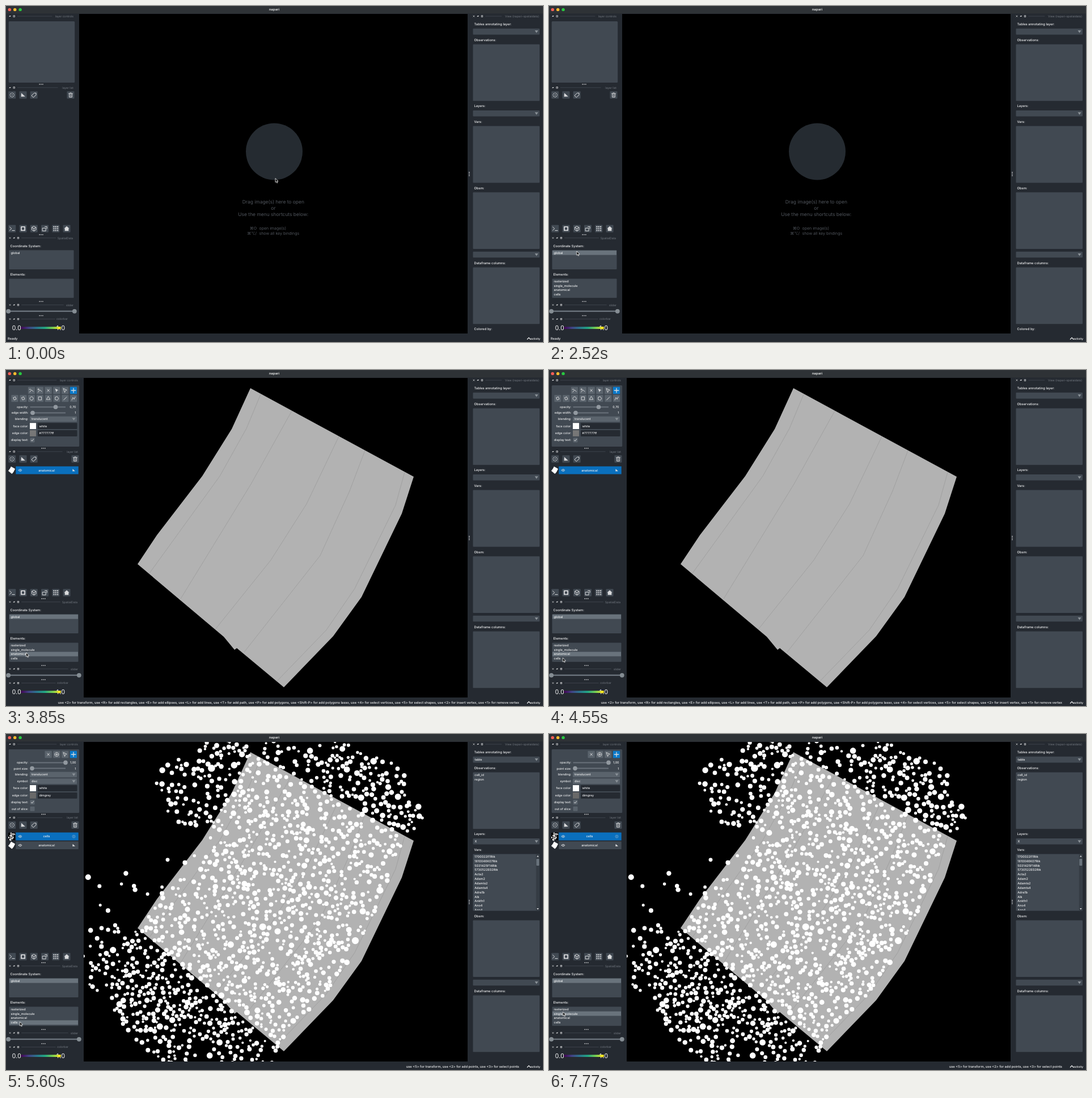
An HTML page for the animation above (8 s loop, 947 by 592 pixels).

```html
<!DOCTYPE html>
<html lang="en">
<head>
<meta charset="utf-8">
<title>napari</title>
<style>
html, body { margin: 0; width: 100%; height: 100%; overflow: hidden; background: #252a31; }
svg { display: block; width: 947px; height: 592px; }
text { font-family: Inter, "Noto Sans", sans-serif; text-rendering: geometricPrecision; white-space: pre; }
.num { font-family: "Open Sans", sans-serif; }
.narrow, .wide, .shapes, .points, .selected, .anatomical, .cells, .single {
  animation: 8s step-end infinite;
}
.narrow { animation-name: narrow; }
.wide { animation-name: wide; }
.shapes { animation-name: shapes; }
.points { animation-name: points; }
.selected { animation-name: selected; }
.anatomical { animation-name: anatomical; }
.cells { animation-name: cells; }
.single { animation-name: single; }
@keyframes narrow { 0% { opacity: 1 } 48.125%, 100% { opacity: 0 } }
@keyframes wide { 0% { opacity: 0 } 48.125%, 100% { opacity: 1 } }
@keyframes shapes { 0% { opacity: 0 } 48.125% { opacity: 1 } 70%, 100% { opacity: 0 } }
@keyframes points { 0% { opacity: 0 } 70%, 100% { opacity: 1 } }
@keyframes selected { 0% { opacity: 0 } 26.25%, 100% { opacity: 1 } }
@keyframes anatomical { 0% { opacity: 0 } 44.625% { opacity: 1 } 65.625%, 100% { opacity: 0 } }
@keyframes cells { 0% { opacity: 0 } 65.625% { opacity: 1 } 97.125%, 100% { opacity: 0 } }
@keyframes single { 0% { opacity: 0 } 97.125%, 100% { opacity: 1 } }
#cursor { animation: cursor 8s ease-in-out infinite; }
@keyframes cursor {
  0%, 9.625% { transform: translate(475px, 303.5px); animation-timing-function: cubic-bezier(.45, 0, .7, .9) }
  17.5% { transform: translate(126px, 417.7px); animation-timing-function: ease-out }
  20.125% { transform: translate(67px, 424px); animation-timing-function: ease-out }
  24.5%, 30.625% { transform: translate(49px, 431px) }
  41.125%, 48.125% { transform: translate(35.5px, 498px) }
  56.875%, 81.375% { transform: translate(24.3px, 507px) }
  87.5%, 91.875% { transform: translate(24.3px, 484px) }
  94.5%, 100% { transform: translate(24.5px, 489.5px) }
}
</style>
</head>
<body>
<svg id="stage" viewBox="0 0 947 592" xmlns="http://www.w3.org/2000/svg"></svg>
<script>
const BG = '#252a31', BOX = '#414952', BTN = '#5a636c', HI = '#69737c', TEXT = '#f0f1f2',
      DIM = '#747a82', FAINT = '#50555c', ICON = '#d9dadc', BLUE = '#0a6fbd';

// Drawing helpers
const each = (list, fn) => list.map(fn).join('');
const rect = (x, y, w, h, fill, r = 0) =>
  `<rect x="${x}" y="${y}" width="${w}" height="${h}" rx="${r}" fill="${fill}"/>`;
const circle = (x, y, r, fill) => `<circle cx="${x}" cy="${y}" r="${r}" fill="${fill}"/>`;
const line = (x1, x2, y, color, w) =>
  `<path d="M${x1} ${y}H${x2}" stroke="${color}" stroke-width="${w}"/>`;
const esc = s => s.replace(/</g, '&lt;').replace(/>/g, '&gt;');
// y is the middle of the capitals
const text = (x, y, s, size = 5.8, fill = TEXT, anchor = 'start', weight = 500) =>
  `<text x="${x}" y="${y + size * .36}" font-size="${size}" fill="${fill}" text-anchor="${anchor}" font-weight="${weight}">${esc(s)}</text>`;
const group = (cls, ...parts) => `<g class="${cls}">${parts.join('')}</g>`;
const poly = pts => 'M' + pts.map(p => p.join(' ')).join('L');

// Icons are built from regular polygons, dots and a few strokes
const ring = (n, r, turn = 0) => Array.from({ length: n }, (_, i) => {
  const a = (i / n + turn) * 2 * Math.PI;
  return [(r * Math.sin(a)).toFixed(2), (-r * Math.cos(a)).toFixed(2)];
});
const ngon = (n, r, turn) => poly(ring(n, r, turn)) + 'z';
const specks = pts => each(pts, p => `M${p.join(' ')}h.01`);
const spokes = (n, r, turn) => each(ring(n, r, turn), p => `M0 0L${p.join(' ')}`);
const lattice = [...Array(9).keys()].map(i => [i % 3 * 3.3 - 3.3, Math.floor(i / 3) * 3.3 - 3.3]);
const pointer = 'M-3-3.5L3.2-.6.6.4-.6 3.4z', vertex = 'M-3.4 3.2L0-1 3.4 2M-4-2H-1.4';
const icons = {
  close: spokes(4, 2.8, 1 / 8),
  points: specks([...ring(8, 3.6), [0, 0]]),
  shapes: 'M-3-3.6L3.8 2.6-3.4 3z',
  labels: 'M-4 .8L.4-3.4H3.8V0L-.6 4z',
  trash: 'M-3.4-2.6H3.4M-1-3.7H1M-2.4-2.4V3.8H2.4V-2.4M0-1V2.4',
  console: 'M-4.2-3L-1 0-4.2 3M0 3.3H4.4',
  square: ngon(4, 4.4, 1 / 8),
  cube: ngon(6, 4.2) + spokes(3, 4.2, 1 / 6),
  roll: 'M-4-1H1.6V4H-4zM0-3.6H3.6V0',
  grid: specks(lattice),
  home: 'M-4.6 0L0-4.2 4.6 0H3.3V4H-3.3V0z',
  arrow: pointer,
  select: pointer,
  move: spokes(4, 4) + specks(ring(4, 3.6)),
  minus: vertex,
  plus: vertex + 'M-2.7-3.3V-.7',
  lasso: ngon(4, 3, .06),
  ellipse: ngon(20, 3.2),
  box: ngon(4, 3.9, 1 / 8),
  tri: ngon(3, 3.8),
  polygon: ngon(5, 3.5, .05),
  segment: spokes(2, 4, 1 / 8),
  path: 'M-3.2 3L-1-2 1 1.4 3.2-3',
  add: ngon(20, 3.7) + spokes(4, 2),
  eye: 'M-3 0Q0-3.6 3 0Q0 3.6-3 0M-.4 0h.8',
  check: 'M-2 0L-.6 1.6 2.2-1.8'
};
const solid = ['shapes', 'home', 'arrow'], bold = { points: 1.6, move: 1.4, square: 1.8, grid: 2.3 };
const icon = (name, x, y, scale = 1) =>
  `<path transform="translate(${x} ${y}) scale(${scale})" d="${icons[name]}" fill="${solid.includes(name) ? ICON : 'none'}" stroke="${ICON}" stroke-width="${bold[name] || (solid.includes(name) ? 0 : 1)}" stroke-linecap="round" stroke-linejoin="round"/>`;
const button = (name, x, y, s = 13, bg = BOX) =>
  rect(x - s / 2, y - s / 2, s, s, bg, 1) + icon(name, x, y, s / 13);
const buttons = (names, x, y, step, draw = button) =>
  each(names.split(' '), (n, i) => draw(n, x + i * step, y));
const dots = (x, y, vertical) => each([-2.8, 0, 2.8], d =>
  circle(x + (vertical ? 0 : d), y + (vertical ? d : 0), .85, ICON));
const down = (x, y) => `<path d="M${x - 3} ${y - 2}h6l-3 4.4z" fill="#8a9197"/>`;

function dock(y, title, x, right, closable) {
  const close = closable ? icon('close', x, y, .6) : '';
  if (closable) x += 7.3;
  return close + `<path d="M${x - 1.8} ${y + .8}l1.2-1.7h2.4l-1.2 1.7z" fill="${ICON}"/>` +
    `<rect x="${x + 6}" y="${y - 1.2}" width="2.4" height="2.4" fill="none" stroke="${ICON}" stroke-width=".8"/>` +
    line(x + 13, right - title.length * 2.55 - 2, y, '#454b53', .8) +
    text(right, y, title, 5.05, DIM, 'end', 400);
}

// Left side; w is how much wider the docks are
const ROW = 7.85;
const listBox = (y, title, w) => text(7.5, y, title) + rect(5.5, y + 7.6, 114 + w, 33.8, BOX, 1);
const highlight = (y, cls, w) => group(cls, rect(6, y - ROW / 2, 113 + w, ROW, HI));
const items = (x, y, names) => each(names.split(' '), (s, i) => text(x, y + i * ROW, s, 5.45));

function leftDocks(w) {
  const c = 62 + w / 2, r = 119 + w;
  return [
    dock(18, 'layer controls', 7, r),
    each([402.8, 520.5, 545.5], y => dots(c, y)),
    buttons('console square cube roll grid home', 10.8, 392.3, 19.25),
    dock(408.7, 'SpatialData', 7, r - 1, true),
    listBox(422.6, 'Coordinate System:', w),
    highlight(434.7, 'selected', w), text(8.5, 434.7, 'global', 5.45),
    listBox(472.9, 'Elements:', w),
    each(['single', 'anatomical', 'cells'], (n, i) => highlight(484.8 + (i + 1) * ROW, n, w)),
    group('selected', items(8.5, 484.8, 'rasterized single_molecule anatomical cells')),
    dock(526.7, 'slider', 7, r, true),
    line(4, r + 2, 537.8, '#69717a', 2.4),
    circle(4.2, 537.8, 3.9, '#858d93'), circle(r + 1.8, 537.8, 3.9, '#858d93'),
    dock(551.6, 'colorbar', 7, 109 + w / 8, true)
  ].join('');
}
const listHead = (y, w) => dots(62 + w / 2, y - 6) + dock(y, 'layer list', 7, 119 + w) +
  buttons('points shapes labels', 10.8, y + 13, 19.2) + button('trash', 114 + w, y + 13);

// Layer controls: rows of [height, draw] flow downwards
const label = (y, s) => text(39.5, y, s + ':', 5.3, TEXT, 'end');
const slider = (s, knob, value) => [10.2, y => label(y, s) + line(42.5, 105, y, '#69717a', 2) +
  circle(knob, y, 3.8, '#9299a0') + text(123.5, y, value, 5.3, TEXT, 'end')];
const choice = (s, value) => [11.7, y => label(y, s) + rect(42, y - 4.7, 83, 9.4, BTN, 1) +
  text(45, y, value, 5.3) + down(119.5, y)];
const swatch = (s, color, value) => [12.8, y => label(y, s) + rect(42, y - 5.4, 11, 10.8, color) +
  rect(56, y - 5.4, 69.5, 10.8, BG, 1) + text(58.5, y, value, 5.3)];
const checkbox = (s, on) => [11.3, y => label(y, s) + rect(42.5, y - 4, 8, 8, BTN, 1) +
  (on ? icon('check', 46.5, y) : '')];
const flow = (y, rows) => each(rows, ([h, draw]) => {
  y += h;
  return draw(y - h / 2);
});
const mode = (name, x, y) => button(name, x, y, 12.3, name === 'move' ? '#0a7acb' : BTN);
const layerRow = (y, name, kind, active) => rect(17.3, y - 6.9, 110.4, 13.8, active ? BLUE : BOX, .5) +
  icon('eye', 25, y) + text(71.5, y, name, 5.5, TEXT, 'middle') + icon(kind, 119.5, y, .65);

// Anatomical layer: the outline starts at the top corner and runs clockwise
const tissue = [[431, 32], [719, 188], [698, 253], [627, 400], [577, 469], [490, 559], [407, 490], [403, 493],
  [384, 470], [232, 342], [266, 291], [346, 187], [398, 104]];
const seams = [
  [[449, 43], [424, 103], [377, 187], [253, 358]],
  [[504, 72], [432, 201], [308, 403]],
  [[587, 117], [530, 236], [467, 335], [369, 457]],
  [[633, 142], [606, 213], [554, 327], [420, 497]],
  [[703, 180], [687, 238], [615, 385], [565, 458], [478, 548]]
];
const sheet = `<path d="${poly(tissue)}z" fill="#b2b2b2"/>
  <path d="${each(seams, poly)}" fill="none" stroke="#989898" stroke-width=".7"/>`;
const thumb = y => `<path transform="translate(4 ${y - 6.5}) scale(.0245) translate(-232 -32)" d="${poly(tissue)}z" fill="#fff"/>`;

// Cells: seeded discs, dense on the tissue and in loose clusters around it
let seed = 11;
const rnd = () => (seed = (seed * 48271) % 2147483647) / 2147483647;
const inside = (x, y, p) => p.reduce((hit, [ax, ay], i) => {
  const [bx, by] = p[(i + 1) % p.length];
  return (ay > y) !== (by > y) && x < ax + (bx - ax) * (y - ay) / (by - ay) ? !hit : hit;
}, false);
const discs = [];
function scatter(count, pick, allowed) {
  for (let i = 0; i < count; i++) {
    for (let tries = 0; tries < 12; tries++) {
      const [x, y] = pick(), r = 2 + 2.3 * rnd() + 2 * rnd() ** 6;
      if (!allowed(x, y)) break;
      if (discs.some(([a, b, s]) => Math.hypot(a - x, b - y) < .8 * (r + s))) continue;
      discs.push([x, y, r]);
      break;
    }
  }
}
const bed = [...tissue.slice(6), ...tissue.slice(0, 1), ...seams[4]];
scatter(2150, () => [232 + rnd() * 480, 32 + rnd() * 527], (x, y) => inside(x, y, bed));

// x, y, radii, tilt in degrees, area per disc
const clusters = [
  [330, 480, 178, 115, 40, 110],
  [178, 395, 45, 65, 0, 280],
  [520, 50, 190, 52, 10, 150],
  [335, 100, 75, 62, 0, 190],
  [680, 130, 60, 40, 30, 140],
  [225, 265, 95, 65, 0, 1500]
];
for (const [cx, cy, rx, ry, tilt, share] of clusters) {
  const c = Math.cos(tilt * Math.PI / 180), s = Math.sin(tilt * Math.PI / 180);
  scatter(Math.PI * rx * ry / share, () => {
    const a = rnd() * 2 * Math.PI, d = Math.sqrt(rnd());
    const u = d * rx * Math.cos(a), v = d * ry * Math.sin(a);
    return [cx + u * c - v * s, cy + u * s + v * c];
  }, (x, y) => !inside(x, y, tissue));
}
const cells = `<g clip-path="url(#view)">${each(discs, d =>
  circle(...d.map(v => v.toFixed(1)), '#fff'))}</g>`;
const cellThumb = rect(4, 174, 12, 13, '#000') + each(discs.filter((_, i) => i % 50 === 0),
  ([x, y]) => circle(4 + (x - 137) / 52, 174 + y / 46, .9, '#fff'));

const shapeControls = [
  rect(4.7, 27, 124.5, 108, BOX, 1.5),
  buttons('minus plus close arrow select move', 45, 36, 14.8, mode),
  buttons('lasso lasso ellipse box tri polygon segment path', 15.5, 50.2, 14.8, mode),
  flow(60.2, [slider('opacity', 87.5, '0,70'), slider('edge width', 47, '1'), choice('blending', 'translucent'),
    swatch('face color', '#fff', 'white'), swatch('edge color', '#777', '#777777ff'), checkbox('display text', true)]),
  listHead(143.8, 8),
  layerRow(176.6, 'anatomical', 'shapes', true), thumb(176.6)
];
const pointControls = [
  rect(4.7, 27, 124.5, 112, BOX, 1.5),
  buttons('close add select move', 74.6, 36, 14.8, mode),
  flow(45.3, [slider('opacity', 105, '1,00'), slider('point size', 46, '1'), choice('blending', 'translucent'),
    choice('symbol', 'disc'), swatch('face color', '#fff', 'white'), swatch('edge color', '#696969', 'dimgrey'),
    checkbox('display text', true), checkbox('out of slice', false)]),
  listHead(147.4, 8),
  layerRow(180.5, 'cells', 'points', true), cellThumb,
  layerRow(196.1, 'anatomical', 'shapes', false), thumb(196.1)
];

// Right side
const combo = y => rect(823.5, y - 5.3, 117.5, 10.6, BOX, 1) + down(935.5, y);
const comboSection = (y, title) => text(825.5, y, title) + combo(y + 13.1);
const section = (y, title) => text(825.5, y, title) + rect(823.5, y + 7.7, 117.5, 99.8, BOX, 1);
const genes = '1700022I11Rik 1810046K07Rik 5031425F14Rik 5730522E02Rik Acta2 Adam2 Adamts2 Adamts4 Adra1b Alk Ankfn1 Ano4 Aqp4';
const table = [
  text(826.5, 45.2, 'table', 5.5), text(826.5, 189.2, 'X', 5.5),
  items(826.3, 71.8, 'cell_id region'),
  `<g clip-path="url(#vars)">${items(826.3, 215.9, genes)}</g>`,
  rect(934.8, 212, 6, 99, '#353c44'), rect(935.3, 220, 5, 12, HI, 1),
  `<path d="M936 216.6h3.6l-1.8-2.6zM936 307h3.6l-1.8 2.6z" fill="${ICON}"/>`
];

const hint = (y, s) => text(471.3, y, s, 8.45, FAINT, 'middle', 400);
const shortcut = (y, keys, s) => text(442, y, keys, 7, FAINT, 'end', 400) + text(446.5, y, s, 7, FAINT, 'start', 400);
const welcome = [
  circle(473, 256.5, 50, '#252b31'),
  hint(344.5, 'Drag image(s) here to open'), hint(355.5, 'or'), hint(366.5, 'Use the menu shortcuts below:'),
  shortcut(391.3, '⌘O', 'open image(s)'), shortcut(400.9, '⌘⌥/', 'show all key bindings')
];
const status = s => text(905, 585.8, s, 5.8, TEXT, 'end');
const viridis = ['#440154', '#414487', '#2a788e', '#22a884', '#7ad151', '#fde725'];
const num = (x, s) => `<text class="num" x="${x}" y="570.8" font-size="11.3" fill="#fff">${s}</text>`;

document.getElementById('stage').innerHTML = [
  `<defs><clipPath id="view"><path d="M137 14H814V577H137z"/></clipPath>
   <clipPath id="vars"><path d="M824 212H941V310.5H824z"/></clipPath>
   <linearGradient id="map">${each(viridis, (c, i) => `<stop offset="${i / 5}" stop-color="${c}"/>`)}</linearGradient></defs>`,
  rect(0, 0, 947, 592, BG), rect(0, 0, 947, 13.3, '#2e3236'),
  each(['#fe5f57', '#febc2e', '#28c840'], (c, i) => circle(6.3 + i * 9.4, 6.4, 2.7, c)),
  text(473, 6.4, 'napari', 5.8, '#dcdddd', 'middle', 700),

  group('narrow', rect(129, 14, 685, 563, '#000'), ...welcome, rect(4.7, 27, 116.5, 108, BOX, 1.5),
    listHead(143.8, 0), leftDocks(0), text(3, 585.8, 'Ready'), text(825.5, 569.2, 'Colored by:')),
  group('wide', rect(137, 14, 677, 563, '#000'), sheet, leftDocks(8)),
  group('shapes', ...shapeControls, status('use <2> for transform, use <R> for add rectangles, use <E> for add ellipses, use <L> for add lines, use <T> for add path, use <P> for add polygons, use <Shift-P> for add polygons lasso, use <4> for select vertices, use <5> for select shapes, use <2> for insert vertex, use <1> for remove vertex')),
  group('points', cells, ...pointControls, status('use <5> for transform, use <2> for add points, use <3> for select points')),

  num(10.8, '0.0'), rect(26.5, 565.2, 70, 3.8, 'url(#map)'), num(88, '1.0'), rect(91, 565, 5.5, 4.4, '#fde725'),

  dots(817, 296, true),
  dock(18, 'View (napari-spatialdata)', 825, 940, true),
  comboSection(32, 'Tables annotating layer:'), section(59.7, 'Observations:'),
  comboSection(176.2, 'Layers:'), section(203.9, 'Vars:'),
  section(320.5, 'Obsm:'), combo(438), section(452.7, 'Dataframe columns:'),
  group('points', ...table),
  `<path d="M919 587.5l3-3.2 3 3.2" fill="none" stroke="${TEXT}" stroke-width="1.2"/>`,
  text(925, 585.8, 'activity', 4.8, TEXT, 'start', 600),
  `<path id="cursor" d="M0 0V7.2L1.7 5.7 2.8 8.2 4 7.7 2.9 5.2H5.1z" fill="#000" stroke="#fff" stroke-width=".8"/>`
].join('');
</script>
</body>
</html>
```
